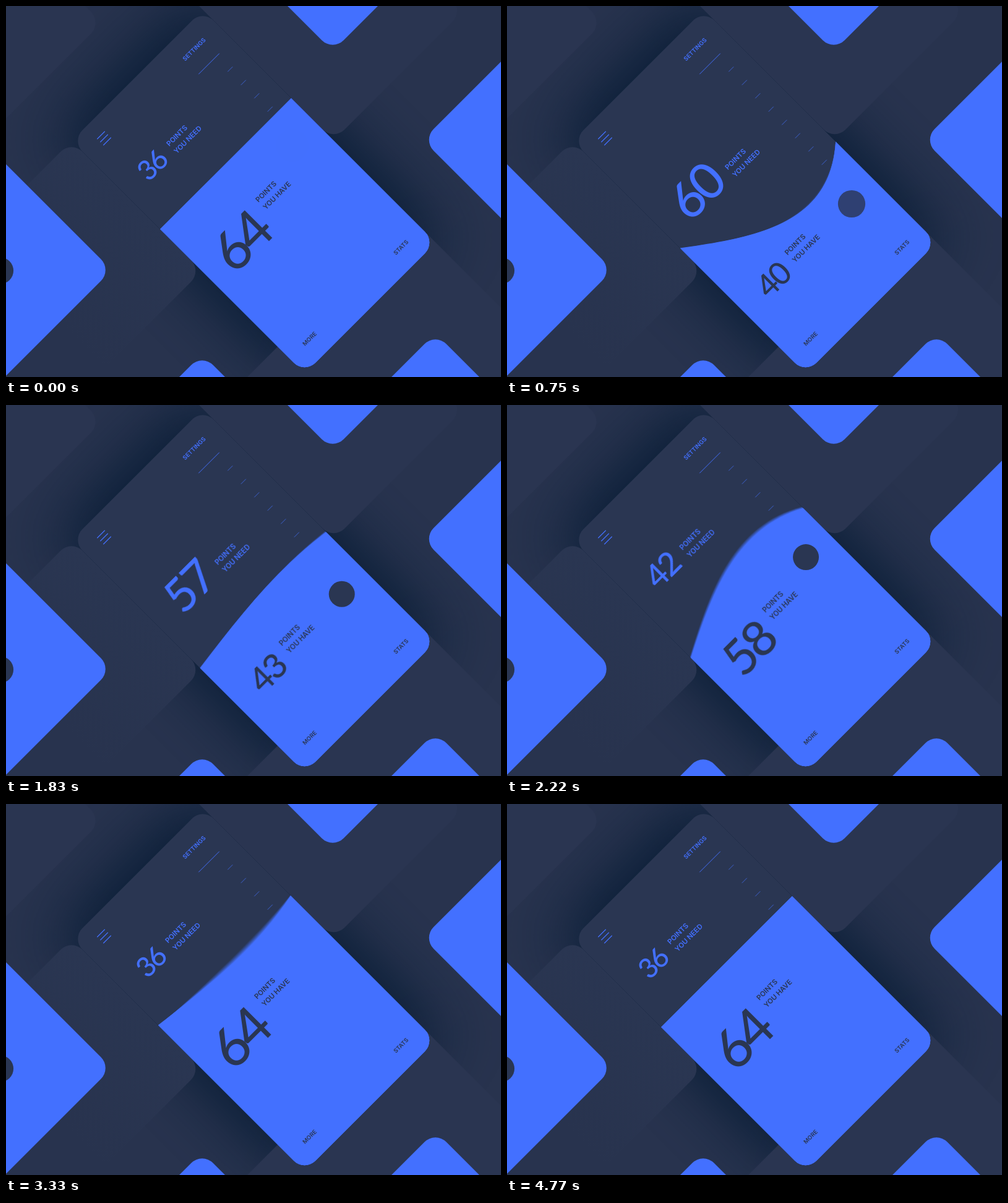
Recreate the animation shown at these times as an HTML page. Size 800x600 px, loop 4800 ms.

```html
<!DOCTYPE html>
<html lang="en">
<head>
<meta charset="utf-8">
<title>Points</title>
<style>
  html, body { margin: 0; width: 100%; height: 100%; overflow: hidden; background: #28334e; }
  svg { display: block; width: 800px; height: 600px; }
  text { font-family: Inter, "Open Sans", sans-serif; font-weight: 600; }
  .label { font-size: 16px; }
  .small { font-size: 13.2px; }
  .num { font-family: Lato, sans-serif; font-weight: 500; text-anchor: end; letter-spacing: -.055em; }
  .mid { text-anchor: middle; }
  .blue { fill: #4370ff; }
  .dark { fill: #2a3652; }
  .tile { fill: #2a3551; }
  .line { stroke: #4370ff; fill: none; }
</style>
</head>
<body>
<svg viewBox="0 0 800 600">
  <defs>
    <clipPath id="card"><rect x="-112" y="324" width="424" height="753" rx="35"/></clipPath>
    <filter id="soft" x="-60%" y="-60%" width="220%" height="220%" color-interpolation-filters="sRGB">
      <feGaussianBlur stdDeviation="75"/>
    </filter>
    <filter id="smear" color-interpolation-filters="sRGB"><feGaussianBlur id="amount" stdDeviation="0 1"/></filter>
    <linearGradient id="fade">
      <stop offset=".3" stop-color="#28334e"/>
      <stop offset="1" stop-color="#2a3652"/>
    </linearGradient>
  </defs>

  <!-- Diagonal space: x = sx - sy, y = sx + sy -->
  <g transform="rotate(-45) scale(.70710678)">
    <rect x="-130" y="300" width="460" height="780" fill="#031932" opacity=".95" filter="url(#soft)"/>

    <rect class="tile" x="-400" y="-200" width="528" height="382" rx="35"/>
    <rect x="-560" y="324" width="448" height="421" rx="35" fill="url(#fade)"/>
    <rect class="tile" x="312" y="-100" width="420" height="847" rx="35"/>
    <rect class="tile" x="-500" y="990" width="812" height="600"/>

    <rect class="blue" x="-900" y="0" width="644" height="598" rx="35"/>
    <rect class="blue" x="455" y="-100" width="500" height="701" rx="35"/>
    <rect class="blue" x="457" y="890" width="500" height="600" rx="35"/>
    <rect class="blue" x="-400" y="1223" width="565" height="500" rx="35"/>
    <rect class="blue" x="-700" y="880" width="454" height="500" rx="35"/>
    <circle class="dark" cx="-437.5" cy="418.5" r="30.5"/>

    <g clip-path="url(#card)">
      <rect class="dark" x="-112" y="324" width="424" height="753"/>
      <path class="line" stroke-width="1.7" d="M-68 362.5h25m-25 10h25m-25 10h25"/>
      <path class="line" stroke-width="1.3" d="M201 421.5h67"/>
      <path class="line" stroke-width="1.2" opacity=".8" id="ticks"/>
      <text class="blue mid" x="234" y="379" font-size="13.5">SETTINGS</text>
      <g id="need" class="blue">
        <text class="num"></text>
        <text class="label" y="-118.5">POINTS</text>
        <text class="label" y="-94.5">YOU NEED</text>
      </g>
      <g id="fill" class="blue"></g>
      <g id="have" class="dark">
        <text class="num"></text>
        <text class="label" y="116">POINTS</text>
        <text class="label" y="140">YOU HAVE</text>
      </g>
      <text class="dark small mid" x="-47.5" y="1033.5">MORE</text>
      <text class="dark small mid" x="248" y="1033.5">STATS</text>
      <circle id="touch" class="dark" cx="237"/>
    </g>
  </g>
</svg>
<script>
  const LOOP = 4800, TOP = 610, TRAVEL = 131, SHUTTER = 34, LAYERS = 12;
  const $ = id => document.getElementById(id);
  const part = (t, from, to) => Math.min(1, Math.max(0, (t - from) / (to - from)));
  const ramp = (t, from, to) => {
    const x = part(t, from, to);
    return x * x * (3 - 2 * x);
  };

  // Drag down, then drag back up
  const down = t => ramp(t, 0, 620);
  const up = t => ramp(t, 1620, 2480);
  const progress = t => down(t) - up(t);
  const calm = t => 1 - ramp(t, 4200, 4770);

  function recoil(t, start) {
    const s = t - start;
    if (s < 0) return 0;
    const w = Math.sin(Math.PI * s / 215);
    return 16 * Math.exp(-.0012 * s) * (w + .4 * w * w);
  }

  function level(t) {
    return TOP + TRAVEL * progress(t) - recoil(t, 770) * (1 - up(t))
      + recoil(t, 2580) * calm(t);
  }

  function swing(t, start, half, decay) {
    const s = Math.max(0, t - start);
    return Math.exp(-decay * s) * Math.cos(Math.PI * s / half);
  }

  // How far the elastic edge is pulled out of line
  function pull(t) {
    return 135 * down(t) * swing(t, 750, 200, .0007) * (1 - ramp(t, 1620, 1900))
      - 95 * up(t) * swing(t, 2652, 256, .0009) * calm(t);
  }

  function edge(t) {
    const y = level(t), w = pull(t);
    const left = TOP + TRAVEL * (ramp(t, 400, 1100) - ramp(t, 1700, 3200))
      - .2 * w * (ramp(t, 750, 1100) - ramp(t, 1620, 1900) + ramp(t, 2660, 2760));
    const right = y + .07 * Math.abs(w);
    const c1 = y + .5 * w + .45 * (left - y);
    return `M-112 ${left}C29 ${c1} 171 ${y + w} 312 ${right}V1100H-112Z`;
  }

  const layers = Array.from({ length: LAYERS }, (_, i) => {
    const p = document.createElementNS("http://www.w3.org/2000/svg", "path");
    p.setAttribute("opacity", 1 / (LAYERS - i));
    return $("fill").appendChild(p);
  });

  $("ticks").setAttribute("d",
    Array.from({ length: 9 }, (_, i) => `M252 ${464.5 + 43 * i}h16`).join(""));

  function place(group, y, x, value, size, base, blur) {
    const num = group.firstElementChild;
    const height = 45.6 + 1.56 * (size - 36);
    group.setAttribute("transform", `translate(${x} ${y})`);
    num.textContent = value;
    num.setAttribute("font-size", height / .72);
    num.setAttribute("x", -25);
    num.setAttribute("y", base(height));
    if (blur) group.setAttribute("filter", "url(#smear)");
    else group.removeAttribute("filter");
  }

  function drawTouch(t) {
    const first = t < 1620;
    const on = first ? part(t, 0, 180) : part(t, 1620, 1800);
    const off = first ? part(t, 695, 995) : part(t, 2575, 2875);
    const c = $("touch");
    c.setAttribute("cy", 688 + 189 * progress(t));
    c.setAttribute("r", Math.SQRT2 * (21 + 6 * (1 - on) + 6 * off));
    c.setAttribute("opacity", on * (1 - off));
  }

  function draw(t) {
    const half = SHUTTER / 2;
    const y = level(t);
    const size = 36 + 24 * progress(t);
    const count = Math.ceil(size - .2);

    // The copy reaching highest gets the faintest layer
    const dir = pull(t + half) + level(t + half) > pull(t - half) + level(t - half) ? 1 : -1;
    layers.forEach((p, i) => {
      const at = t + dir * SHUTTER * (i / (LAYERS - 1) - .5);
      p.setAttribute("d", edge(Math.min(LOOP, Math.max(0, at))));
    });

    const smear = Math.abs(level(t + half) - level(t - half)) / 7;
    const blur = smear > .25;
    if (blur) $("amount").setAttribute("stdDeviation", `0 ${smear}`);

    place($("need"), y, 36.5 + 2.29 * (size - 36), count, size, () => -94, blur);
    place($("have"), y, 90 - 1.67 * (size - 36), 100 - count, 100 - size, h => 106 + h, blur);
    drawTouch(t);
  }

  function frame(now) {
    draw(now % LOOP);
    requestAnimationFrame(frame);
  }
  draw(0);
  requestAnimationFrame(frame);
</script>
</body>
</html>
```
